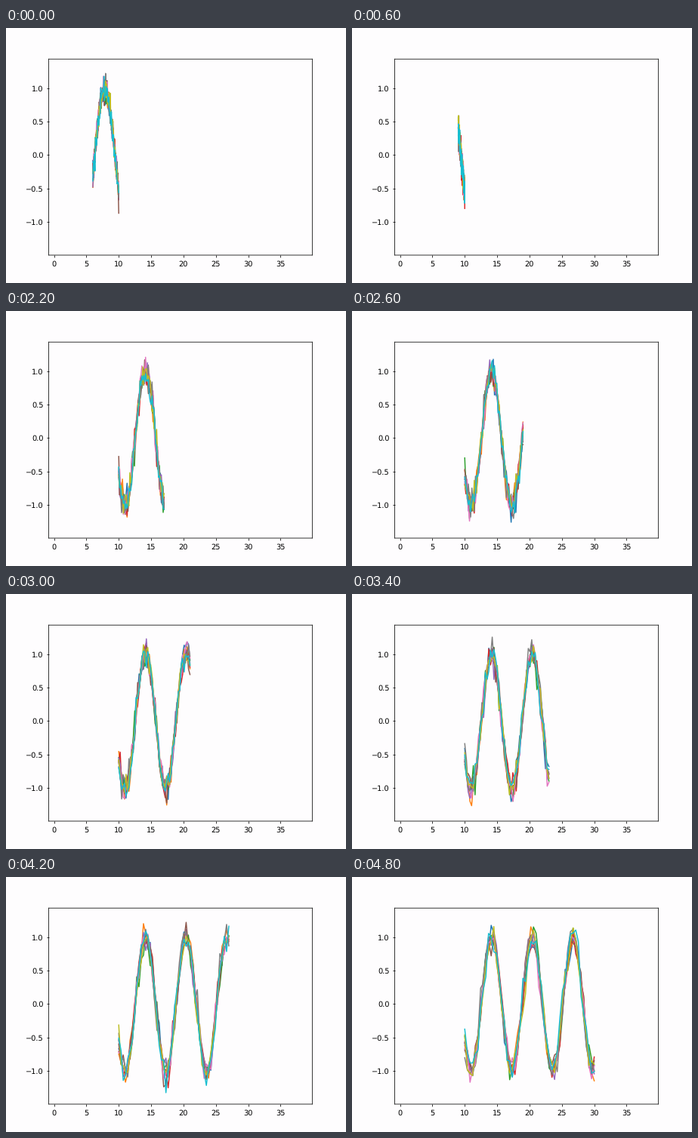
Animation of 450x338 px, one loop 5000 ms. Source, as a matplotlib script:

```python
import numpy as np
import matplotlib.pyplot as plt
from matplotlib.animation import FuncAnimation

FRAMES = 25
CURVES = 10
SAMPLES = 50
NOISE = 0.1
ANCHOR = 10     # fixed end of the drawn range
START = 6       # moving end of the range at the beginning
PAPER = "#fefdfe"

plt.rcParams.update({"font.family": "DejaVu Sans", "text.hinting": "none"})

# 450 x 338 pixels; the axes box is laid out on a 640 x 480 grid
fig = plt.figure(figsize=(6.4, 4.8072), dpi=70.3125, facecolor=PAPER)
ax = fig.add_axes([80.5 / 640, 52.5 / 480, 496 / 640, 369 / 480],
                  facecolor=PAPER)
ax.set_xlim(-0.81, 39.89)
ax.set_ylim(-1.495, 1.434)
ax.set_xticks(range(0, 40, 5))
ax.set_yticks(np.arange(-1, 1.1, 0.5))
for spine in ax.spines.values():
    spine.set_snap(False)

lines = [ax.plot([], [], color=f"C{i}", lw=1.5)[0] for i in range(CURVES)]


def update(frame):
    """Draw noisy sines between the anchor and an end moving one unit per frame."""
    rng = np.random.default_rng(7 + frame)
    x = np.linspace(ANCHOR, START + frame, SAMPLES)
    for line in lines:
        line.set_data(x, np.sin(x) + rng.normal(0, NOISE, SAMPLES))
    return lines


anim = FuncAnimation(fig, update, frames=FRAMES, interval=200,
                     init_func=lambda: update(0), repeat=True, repeat_delay=0)
plt.show()
```
